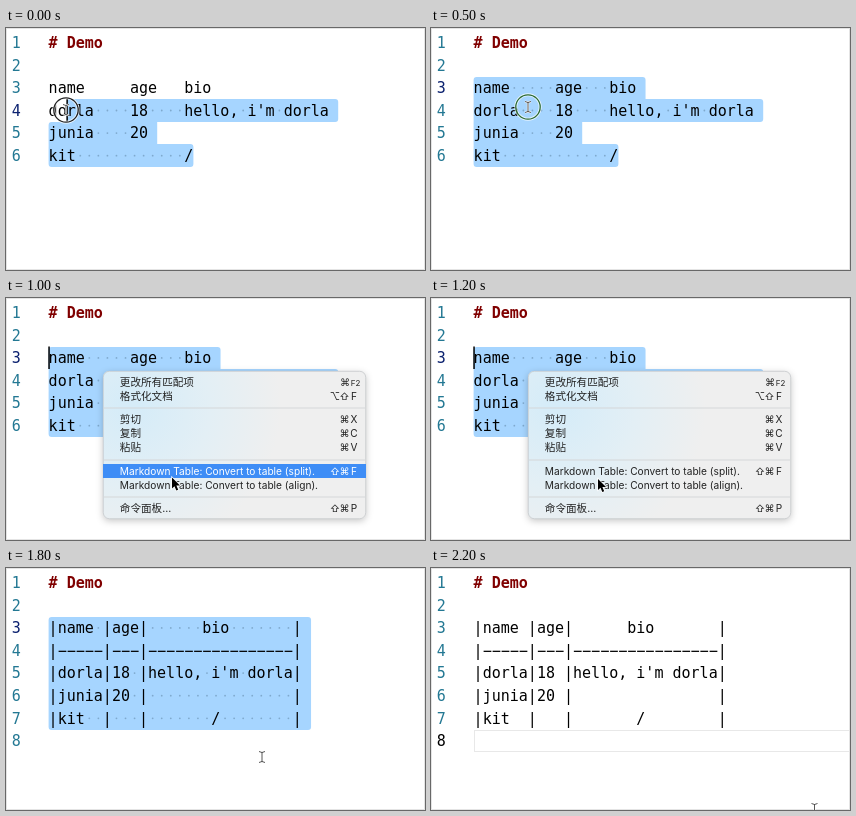
Write an HTML page with a canvas that moves like this. It is 419x242 px and loops after 2.3 s.

```html
<!DOCTYPE html>
<html lang="en">
<head>
<meta charset="utf-8">
<title>Table conversion demo</title>
<style>
html, body { margin: 0; width: 100%; height: 100%; overflow: hidden; background: #fff; }
canvas { display: block; }
</style>
</head>
<body>
<canvas width="419" height="242"></canvas>
<script>
const g = document.querySelector('canvas').getContext('2d');
const LOOP = 2300, LEFT = 42.6, CHAR = 9.05, LINE = 22.6;
const MONO = '15.03px "DejaVu Sans Mono", monospace';

const plain = ['# Demo', '', 'name     age   bio', "dorla    18    hello, i'm dorla",
  'junia    20', 'kit            /'];
const table = ['# Demo', '', '|name |age|      bio       |', '|-----|---|----------------|',
  "|dorla|18 |hello, i'm dorla|", '|junia|20 |                |',
  '|kit  |   |       /        |', ''];

// Pointer path: time, x, y
const path = [[0, 60, 82], [100, 52, 74], [200, 45, 62], [300, 45, 61], [500, 97, 79],
  [600, 98, 80], [1000, 166, 179.5], [1100, 166, 179.5], [1200, 167, 181], [1400, 166, 181],
  [1500, 166, 181], [1800, 256, 189], [1900, 256, 189], [2200, 383.5, 241]];

// Menu rows: centre y, label, shortcut
const items = [[84, '更改所有匹配项', '⌘F2'], [98, '格式化文档', '⌥⇧F'],
  [121, '剪切', '⌘X'], [135, '复制', '⌘C'], [149, '粘贴', '⌘V'],
  [173, 'Markdown Table: Convert to table (split).', '⇧⌘F'],
  [187, 'Markdown Table: Convert to table (align).', ''],
  [210, '命令面板...', '⇧⌘P']];

const lineTop = n => 3.3 + (n - 1) * LINE;
const colX = c => LEFT + c * CHAR;

function pointer(t) {
  const i = path.findIndex(k => k[0] >= t);
  if (i < 1) return path[0].slice(1);
  const [t0, x0, y0] = path[i - 1], [t1, x1, y1] = path[i];
  const u = (t - t0) / (t1 - t0);
  return [x0 + (x1 - x0) * u, y0 + (y1 - y0) * u];
}

function text(s, x, y, font, color, align = 'left') {
  g.font = font;
  g.fillStyle = color;
  g.textAlign = align;
  g.fillText(s, x, y);
}

function rect(x, y, w, h, color, radii = 0) {
  g.fillStyle = color;
  g.beginPath();
  g.roundRect(x, y, w, h, radii);
  g.fill();
}

function stroke(points, color, width) {
  g.strokeStyle = color;
  g.lineWidth = width;
  g.beginPath();
  points.forEach(([x, y], i) => i % 2 ? g.lineTo(x, y) : g.moveTo(x, y));
  g.stroke();
}

// sel: first line, last line, start column, whether the last newline is included
function select(lines, [from, to, start, newline]) {
  const begin = n => n === from ? start : 0;
  const end = n => n < from || n > to ? -1 : lines[n - 1].length + (n < to || newline ? 1 : 0);
  for (let n = from; n <= to; n++) {
    const a = begin(n), b = end(n), top = Math.round(lineTop(n));
    const r = [n === from || (n === from + 1 && start) ? 3 : 0, end(n - 1) < b ? 3 : 0,
      end(n + 1) < b ? 3 : 0, n === to ? 3 : 0];
    rect(colX(a), top, (b - a) * CHAR, Math.round(lineTop(n + 1)) - top, '#a6d5ff', r);
    g.fillStyle = '#7fa9cd';
    [...lines[n - 1]].forEach((c, i) => {
      if (c !== ' ' || i < a) return;
      g.beginPath();
      g.arc(colX(i + 0.5), lineTop(n) + 11.4, 0.9, 0, 7);
      g.fill();
    });
  }
}

function editor(lines, active, sel) {
  if (sel) select(lines, sel);
  else {
    g.strokeStyle = '#e8e8e8';
    g.lineWidth = 1;
    g.strokeRect(43.5, Math.round(lineTop(active)) + 0.5, 380, 21);
  }
  const count = Math.max(lines.length, 6);
  for (let n = 1; n <= count; n++) {
    const y = lineTop(n) + 16.6;
    // The minus sign has the wide stroke that this code font gives a hyphen
    const shown = (lines[n - 1] || '').replaceAll('-', '−');
    text(n, 5.7, y, MONO, n !== active ? '#237893' : sel ? '#0b216f' : '#000');
    text(shown, LEFT, y, n === 1 ? 'bold ' + MONO : MONO, n === 1 ? '#800000' : '#000');
  }
}

function menu(hoverY) {
  const shade = g.createRadialGradient(125, 108, 10, 125, 108, 150);
  shade.addColorStop(0, '#d6ecf8');
  shade.addColorStop(0.5, '#e3eff5');
  shade.addColorStop(1, '#efefef');
  g.save();
  g.shadowColor = 'rgba(0,0,0,.22)';
  g.shadowBlur = 7;
  g.shadowOffsetY = 2;
  rect(97, 73, 263, 148, shade, 6);
  g.restore();
  g.strokeStyle = '#c2c5c8';
  g.lineWidth = 0.7;
  g.beginPath();
  g.roundRect(97.3, 73.3, 262.4, 147.4, 6);
  g.stroke();
  for (const y of [109.5, 161.5, 198.5]) rect(98, y, 261, 1, '#d6d8da');
  for (const [y, label, keys] of items) {
    const on = Math.abs(hoverY - y) <= 7;
    const color = on ? '#fff' : '#222';
    const base = y + 3.5;
    if (on) rect(97, y - 7, 263, 14, '#3e8df6');
    const size = label.charCodeAt(0) > 255 ? 10.6 : 10.17;
    const face = 'px Inter, "Noto Sans CJK SC", "DejaVu Sans", sans-serif';
    text(label, 113.8, base, size + face, color);
    if (keys === '⌘F2') {
      text('⌘', 339, base, 10.1 + face, color, 'center');
      text('F2', 349.5, base, 8 + face, color, 'center');
    } else {
      [...keys].forEach((k, i) =>
        text(k, 348 - (keys.length - 1 - i) * 9.5, base, 10.1 + face, color, 'center'));
    }
  }
}

function beam(x, y) {
  const marks = [[x, y - 5], [x, y + 5], [x - 3, y - 5.5], [x, y - 4.5], [x + 3, y - 5.5],
    [x, y - 4.5], [x - 3, y + 5.5], [x, y + 4.5], [x + 3, y + 5.5], [x, y + 4.5]];
  stroke(marks, '#fff', 2.2);
  stroke(marks, '#444', 0.9);
}

function arrow(x, y) {
  g.beginPath();
  [[0, 0], [0, 11], [2.5, 8.8], [4.3, 13], [6.2, 12.2], [4.4, 8], [8, 8]]
    .forEach(([dx, dy]) => g.lineTo(x + dx, y + dy));
  g.closePath();
  g.fillStyle = '#000';
  g.strokeStyle = '#fff';
  g.lineWidth = 1.4;
  g.stroke();
  g.fill();
}

function ring(x, y, color) {
  g.beginPath();
  g.arc(x, y, 12.2, 0, 7);
  g.strokeStyle = 'rgba(255,255,255,.7)';
  g.lineWidth = 3;
  g.stroke();
  g.strokeStyle = color;
  g.lineWidth = 1.3;
  g.stroke();
}

function draw(t) {
  const [x, y] = pointer(t);
  const done = t >= 1500, idle = t >= 2100, open = t >= 600 && t < 1400;
  rect(0, 0, 419, 242, '#fff');
  if (done) editor(table, idle ? 8 : 3, idle ? null : [3, 7, 0, true]);
  else if (t < 200) editor(plain, 4, [4, 6, t ? 1 : 2, false]);
  else editor(plain, 3, [3, 6, 0, false]);

  const caret = t < 200 ? [colX(t ? 1 : 2), 4] : [LEFT, 3];
  if (t < 300 || (t >= 900 && !done)) rect(caret[0] - 0.3, lineTop(caret[1]), 1.5, LINE, '#000');

  g.strokeStyle = '#e4e4e4';
  g.lineWidth = 1;
  g.strokeRect(0.5, 0.5, 418, 241);

  if (open) {
    g.globalAlpha = t === 1300 ? 0.4 : 1;
    menu(t === 1200 || t < 700 ? 0 : t === 1300 ? 173 : y);
    g.globalAlpha = 1;
    arrow(x, y);
  } else {
    if (t < 300) ring(x, y, '#222');
    if (t === 500) ring(x, y, '#2c6b35');
    beam(x, y);
  }
}

const start = performance.now();
function tick() {
  const t = (performance.now() - start) % LOOP;
  draw(Math.floor(t / 100) * 100);
  requestAnimationFrame(tick);
}
tick();
</script>
</body>
</html>
```
